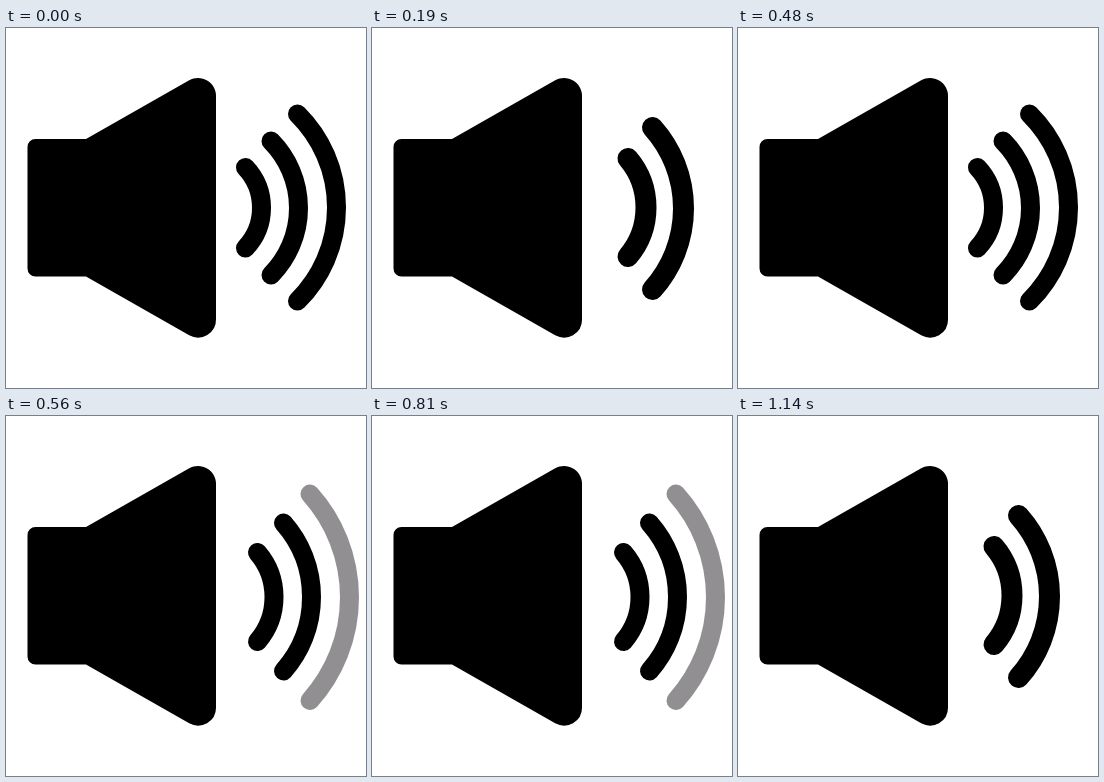
An HTML page that plays this animation: 360x360 px, repeating every 1.22 s.

```html
<!DOCTYPE html>
<html lang="en">
<head>
<meta charset="utf-8">
<title>Speaker</title>
<style>
  html, body { margin: 0; width: 100%; height: 100%; overflow: hidden; background: #fff; }
  svg { display: block; width: 100%; height: 100%; }
  #waves path { fill: none; stroke-linecap: round; }
</style>
</head>
<body>
<svg viewBox="0 0 360 360">
  <path d="M29.5 111H80L183.2 52.3A18 18 0 0 1 210 68V291A18 18 0 0 1 183.2 307.2L80 248.5H29.5A8 8 0 0 1 21.5 240.5V119A8 8 0 0 1 29.5 111Z"/>
  <g id="waves"></g>
</svg>
<script>
const LOOP = 1220;
const STARTS = [0, 70, 190, 240, 320, 400, 480, 560, 650, 730, 810, 890, 970, 1060, 1140];

// Arc from (x, top) to (x, bottom), bulging right to the given peak.
function wave(x, top, bottom, peak, width = 19, color = '#000') {
  const half = (bottom - top) / 2, sag = peak - x;
  const r = (half * half + sag * sag) / (2 * sag);
  return `<path d="M${x} ${top}A${r} ${r} 0 0 1 ${x} ${bottom}" stroke="${color}" stroke-width="${width}"/>`;
}

// The three poses repeat in this order.
const POSES = [
  [wave(239.5, 139.5, 220, 255.5), wave(265, 113, 247, 292.5), wave(291.5, 86, 273, 330.5)],
  [wave(251.5, 136.5, 225.5, 268), wave(277.5, 107, 255, 305.5), wave(304, 78, 284.5, 343.5, 19, '#918f92')],
  [wave(256, 130.5, 228.5, 274, 21), wave(280.5, 99.5, 261.5, 311.5, 21)]
].map(list => list.join(''));

const waves = document.getElementById('waves');
const origin = performance.now();
let shown = -1;

function draw() {
  const t = (performance.now() - origin) % LOOP;
  const pose = (STARTS.filter(s => s <= t).length - 1) % POSES.length;
  if (pose !== shown) waves.innerHTML = POSES[shown = pose];
  requestAnimationFrame(draw);
}
draw();
</script>
</body>
</html>
```
